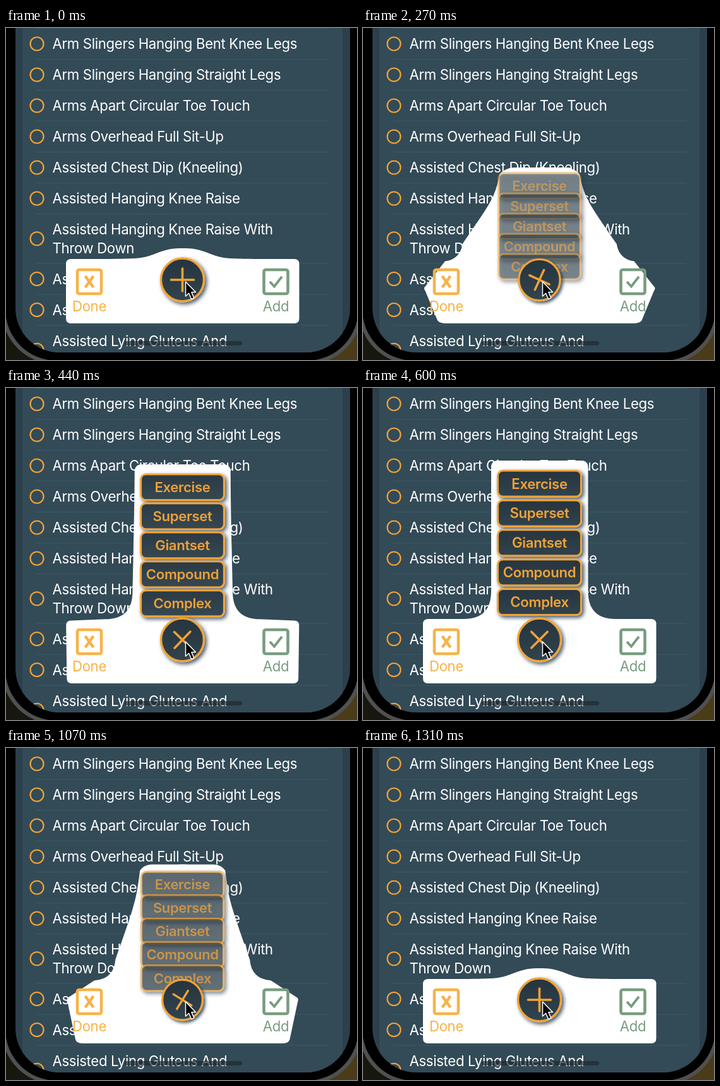
These frames come from a looping animation (556x526 px, 1.35 s). An HTML page:

```html
<!DOCTYPE html>
<html lang="en">
<head>
<meta charset="utf-8">
<title>Expanding add menu</title>
<style>
html, body { margin: 0; width: 100%; height: 100%; overflow: hidden; background: #000; }
svg { display: block; width: 556px; height: 526px; }
text { font: 22.2px Inter, Roboto, sans-serif; letter-spacing: -.34px; }
.label { text-anchor: middle; }
.pill text { font-weight: 600; fill: #f2a336; }
.line { fill: none; stroke: #f2a336; }
</style>
</head>
<body>
<svg viewBox="0 0 556 526">
  <defs>
    <clipPath id="screen"><rect x="15" y="-100" width="530" height="614" rx="70"/></clipPath>
    <linearGradient id="dark" x2="0" y2="1">
      <stop stop-color="#26353f"/><stop offset="1" stop-color="#31434d"/>
    </linearGradient>
    <filter id="shadow" x="-30%" y="-30%" width="170%" height="170%" color-interpolation-filters="sRGB">
      <feGaussianBlur in="SourceAlpha" stdDeviation="3"/>
      <feOffset dx="3" dy="3" result="blur"/>
      <feFlood flood-color="#152c40" flood-opacity=".8"/>
      <feComposite in2="blur" operator="in"/>
      <feComposite in2="SourceAlpha" operator="out" result="outside"/>
      <feMerge><feMergeNode in="outside"/><feMergeNode in="SourceGraphic"/></feMerge>
    </filter>
  </defs>

  <rect width="278" height="526" fill="#17170f"/>
  <rect x="278" width="278" height="526" fill="#4a3c18"/>
  <rect x="-4" y="-100" width="565" height="630" rx="84" stroke="#505050" stroke-width="6"/>

  <g clip-path="url(#screen)">
    <rect width="556" height="526" fill="#2c404c"/>
    <rect x="26" width="507" height="526" fill="#334a57"/>
    <g id="list" fill="#fff"></g>
    <rect x="188" y="496" width="186" height="7" rx="3.5" fill="#20282d" opacity=".68"/>
  </g>

  <g fill="#fff">
    <path id="leftHalf"/>
    <path id="rightHalf" transform="translate(559.5) scale(-1 1)"/>
  </g>
  <g fill="none" stroke="#f8b349" stroke-width="4.6">
    <rect x="113" y="383" width="38" height="38" rx="3"/>
    <path d="M125.500 393L138.500 411M138.500 393L125.500 411"/>
    <text class="label" x="132" y="449" fill="#f8b349" stroke="none">Done</text>
  </g>
  <g fill="none" stroke="#799c80" stroke-width="4.6">
    <rect x="408.500" y="383" width="38" height="38" rx="3"/>
    <path d="M418 402L425 409.500L437 394" stroke-width="4"/>
    <text class="label" x="427.500" y="449" fill="#799c80" stroke="none">Add</text>
  </g>

  <g id="pills"></g>
  <g id="button" filter="url(#shadow)">
    <circle r="34" fill="url(#dark)" stroke="#f2a336" stroke-width="3.4"/>
    <path id="plus" class="line" d="M-18 0H18M0 -18V18" stroke-width="3.6" stroke-linecap="round"/>
  </g>
  <path d="M284.500 402V425L289.600 420.200L293.600 429.500L297.800 427.600L293.900 418.500H300.500Z"
        fill="#000" stroke="#fff" stroke-width="1.5" stroke-linejoin="round"/>
</svg>

<script>
const LOOP = 1350;
const OPEN = { press: 20, start: 21, length: 474 };
const CLOSE = { press: 910, start: 920, length: 400, end: 1310 };
const $ = id => document.getElementById(id);
const mix = (a, b, p) => a + (b - a) * p;

const rows = [
  'Arm Slingers Hanging Bent Knee Legs', 'Arm Slingers Hanging Straight Legs',
  'Arms Apart Circular Toe Touch', 'Arms Overhead Full Sit-Up',
  'Assisted Chest Dip (Kneeling)', 'Assisted Hanging Knee Raise',
  'Assisted Hanging Knee Raise With|Throw Down', 'Assisted Hip Lift',
  'Assisted Leg Curl', 'Assisted Lying Gluteus And|Piriformis Stretch'
];

function buildList() {
  let top = 0.5, markup = '';
  for (const row of rows) {
    const lines = row.split('|');
    const height = lines.length > 1 ? 78.5 : 49;
    markup += `<path d="M48 ${top}H512" stroke="#3c5a66"/>
      <circle class="line" cx="49" cy="${top + height / 2}" r="10.500" stroke-width="2.200"/>`;
    lines.forEach((line, i) => {
      markup += `<text x="73.500" y="${top + 32.7 + i * 29.5}">${line}</text>`;
    });
    top += height;
  }
  $('list').innerHTML = markup;
}

// Opacity goes on the parts of a pill, so that its label blends with its own fill
const pillNames = ['Exercise', 'Superset', 'Giantset', 'Compound', 'Complex'];
$('pills').innerHTML = pillNames.map(name => `<g class="pill" filter="url(#shadow)">
  <rect class="line" x="-66" y="-20.500" width="132" height="41" rx="8" stroke-width="3"
    style="fill:url(#dark)"/>
  <text class="label" y="8">${name}</text></g>`).join('');
const pills = [...$('pills').children];
buildList();

// Left outline of the panel: command, then [closed x, closed y, open x, open y] points
const outline = [
  ['M', [285, 349, 285, 115]],
  ['L', [275, 349, 213, 115]],
  ['C', [258, 349, 207, 115], [246, 354, 203, 119], [234, 358.5, 203, 125]],
  ['C', [213, 366, 203, 190], [213, 366, 203, 190], [103, 366, 203, 322]],
  ['Q', [95, 366, 203, 366], [95, 374, 159, 366]],
  ['L', [95, 460, 103, 366]],
  ['Q', [95, 468, 95, 366], [103, 468, 95, 374]],
  ['L', [146, 468, 95, 460]],
  ['Q', [154, 468, 95, 468], [162, 468, 103, 468]],
  ['L', [285, 468, 285, 468]]
];

const outlineAt = p => outline.map(([command, ...points]) =>
  command + points.map(([x0, y0, x1, y1]) => `${mix(x0, x1, p)} ${mix(y0, y1, p)}`).join(' ')
).join('') + 'Z';

// cubic-bezier(.42, 0, .58, 1)
function easeInOut(u) {
  if (u <= 0) return 0;
  if (u >= 1) return 1;
  let low = 0, high = 1, s;
  for (let i = 0; i < 20; i++) {
    s = (low + high) / 2;
    const x = 1.26 * s * (1 - s) ** 2 + 1.74 * s * s * (1 - s) + s ** 3;
    if (x < u) low = s; else high = s;
  }
  return s * s * (3 - 2 * s);
}

const progress = (phase, t) => easeInOut((t - phase.start) / phase.length);

function render(t) {
  const closing = t >= CLOSE.press;
  const resting = t < OPEN.press || t >= CLOSE.end;
  const eased = resting ? 1 : progress(closing ? CLOSE : OPEN, t);
  const p = resting ? 0 : closing ? 1 - eased : eased;

  const d = outlineAt(p);
  $('leftHalf').setAttribute('d', d);
  $('rightHalf').setAttribute('d', d);
  pills.forEach((pill, i) => {
    const y = mix(369.5 + 13.9 * i, 151.5 + 46.9 * i, p);
    pill.setAttribute('transform', `translate(279.5 ${y}) scale(${mix(.96, 1, p)})`);
    for (const part of pill.children) part.setAttribute('opacity', p);
  });
  $('button').setAttribute('transform', `translate(279.5 399) scale(${mix(.91, 1, eased)})`);
  $('plus').setAttribute('transform', `rotate(${45 * p})`);
}

const origin = performance.now();
function tick() {
  render((performance.now() - origin) % LOOP);
  requestAnimationFrame(tick);
}
render(0);
requestAnimationFrame(tick);
</script>
</body>
</html>
```
